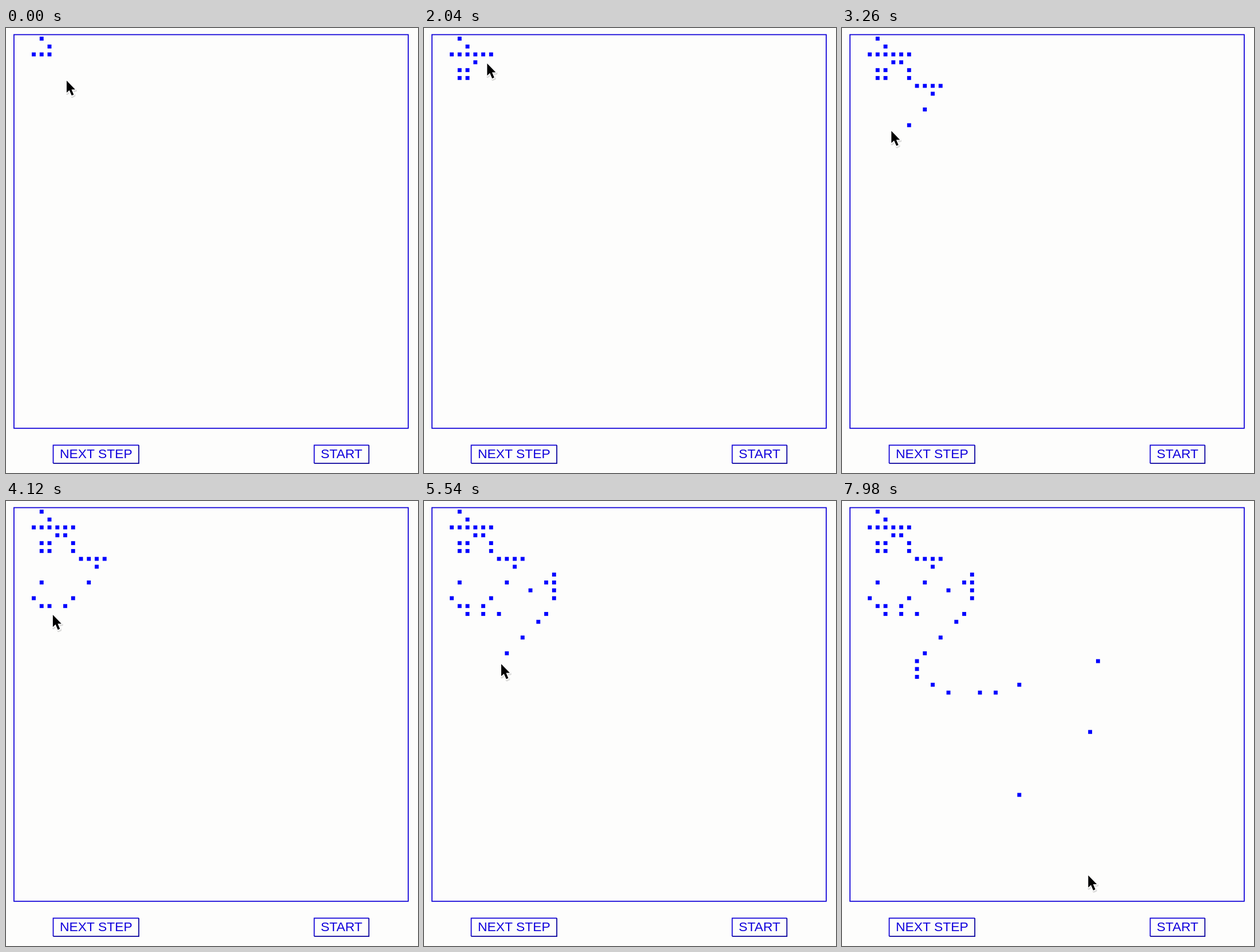
An HTML page that plays this animation: 720 by 778 pixels, repeating every 8 s.

```html
<!DOCTYPE html>
<html lang="en">
<head>
<meta charset="utf-8">
<title>Cell grid drawing</title>
<style>
html, body { margin: 0; width: 100%; height: 100%; overflow: hidden; background: #fdfdfc; }
svg { display: block; width: 100%; height: 100%; }
text { font: 22.9px "Liberation Sans", Arial, sans-serif; fill: #1000dc; text-anchor: middle; }
.line, .shade { fill: none; stroke: #1000d8; stroke-width: 1.75; }
.shade { stroke: #08009c; }
</style>
</head>
<body>
<svg viewBox="0 0 720 778">
  <rect class="line" x="13.9" y="11.6" width="689" height="688.2"/>
  <g id="buttons"></g>
  <g id="cells" fill="#00f"></g>
  <g id="cursor" stroke-linejoin="round">
    <path transform="translate(1 2)" stroke="#000" stroke-width="4" opacity=".13"/>
    <path stroke="#fff" stroke-width="3.4" paint-order="stroke"/>
  </g>
</svg>
<script>
const LOOP = 8000, PITCH = 13.755, LEFT = 14.1, TOP = 11.75, LAG = 105;
const byId = id => document.getElementById(id);
const px = col => LEFT + (col + 0.5) * PITCH;
const py = row => TOP + (row + 0.5) * PITCH;

function add(parent, tag, attrs, label = "") {
  const el = document.createElementNS("http://www.w3.org/2000/svg", tag);
  for (const name in attrs) el.setAttribute(name, attrs[name]);
  el.textContent = label;
  parent.append(el);
  return el;
}

function addButton(x, width, label) {
  const parent = byId("buttons"), right = x + width, top = 729.3, bottom = 761;
  add(parent, "path", { class: "line", d: `M${x} ${bottom}V${top}H${right}` });
  add(parent, "path", { class: "shade", d: `M${x} ${bottom}H${right}V${top}` });
  add(parent, "text", { x: x + width / 2, y: 752 }, label);
}
addButton(82.5, 149.6, "NEXT STEP");
addButton(538.6, 95.6, "START");

const cells = [];
function addCell(col, row, t) {
  const size = PITCH / 2;
  const el = add(byId("cells"), "rect", {
    x: px(col) - size / 2, y: py(row) - size / 2, width: size, height: size
  });
  cells.push({ el, t });
}

// Strokes on the grid: start time, mouse samples, start, end, optional bend.
const strokes = [
  [450, 4, [4, 5], [4, 4], [2, 4.5]],
  [1560, 3, [5, 2], [7, 2]],
  [1920, 2, [5, 3], [6.49, 3]],
  [2160, 2, [7, 4], [7, 5]],
  [2370, 4, [8, 6], [11, 6]],
  [2890, 4, [10, 7.49], [5.5, 12.4]],
  [3340, 4, [3, 9], [4, 12], [1, 12.5]],
  [4130, 3, [4.49, 13], [8, 13]],
  [4420, 3, [12, 10], [15, 8]],
  [4710, 3, [15, 9], [15, 11]],
  [4995, 4, [14.49, 12.5], [9, 18]],
  [5540, 3, [8.29, 19.22], [8, 21]],
  [5880, 2, [10, 22], [12, 23]],
  [6160, 3, [16, 23], [20.8, 22]],
  [6700, 3, [31, 19], [21, 36], [34, 28.5]]
];
const first = { t: 200, x: 6.18, y: 5.18 };
const last = { t: 7980, x: 29.76, y: 46.08 };

function curve(a, b, bend, u) {
  const v = 1 - u;
  return a.map((p, k) => bend
    ? p * v * v + 2 * bend[k] * u * v + b[k] * u * u
    : p + (b[k] - p) * u);
}

// The glider is already there; each mouse sample fills the cell under it.
for (const [col, row] of [[3, 0], [4, 1], [2, 2], [3, 2], [4, 2]]) addCell(col, row, 0);
const path = [first];
strokes.forEach(([start, count, from, to, bend], i) => {
  const end = i + 1 < strokes.length ? strokes[i + 1][0] : last.t;
  for (let k = 0; k < count; k++) {
    const t = start + (end - start) * k / count;
    const [x, y] = curve(from, to, bend, k / (count - 1));
    path.push({ t, x, y });
    addCell(Math.round(x), Math.round(y), t + LAG);
  }
});
path.push(last);

function slope(i, axis) {
  const a = path[i - 1], b = path[i + 1];
  return a && b ? (b[axis] - a[axis]) / (b.t - a.t) : 0;
}

// Cubic Hermite curve through the mouse samples.
function position(t, axis) {
  if (t <= first.t) return first[axis];
  if (t >= last.t) return last[axis];
  const i = path.findIndex(p => p.t > t) - 1;
  const a = path[i], b = path[i + 1], span = b.t - a.t;
  const u = (t - a.t) / span, v = 1 - u;
  return a[axis] * (1 + 2 * u) * v * v + b[axis] * u * u * (3 - 2 * u)
    + span * u * v * (slope(i, axis) * v - slope(i + 1, axis) * u);
}

const cursor = byId("cursor");
for (const shape of cursor.children) {
  shape.setAttribute("d", "M0 0V21.2L4.7 16.8L8.8 26.2L12.4 24.6L8.5 15.5H15Z");
}

function render(t) {
  for (const c of cells) c.el.style.display = t >= c.t ? "" : "none";
  const x = px(position(t, "x")), y = py(position(t, "y")) + 2;
  cursor.setAttribute("transform", `translate(${x.toFixed(2)} ${y.toFixed(2)})`);
}

const start = performance.now();
function tick(now) {
  render(Math.max(0, now - start) % LOOP);
  requestAnimationFrame(tick);
}
render(0);
requestAnimationFrame(tick);
</script>
</body>
</html>
```
